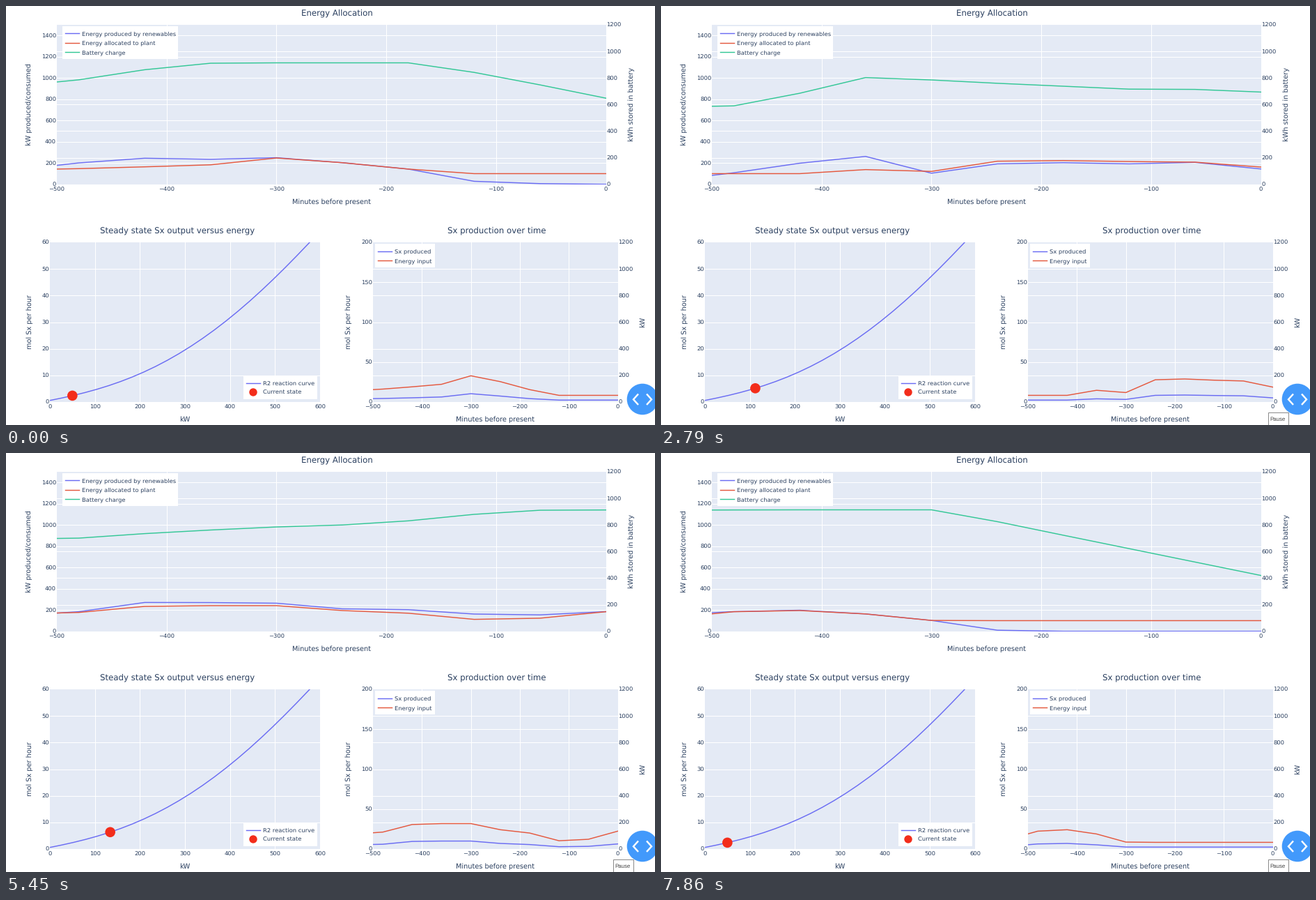
A matplotlib script for the animation above (8000 ms loop, 932 by 601 pixels).

```python
import numpy as np
import matplotlib.pyplot as plt
from matplotlib.animation import FuncAnimation
from matplotlib.patches import Circle, Rectangle

W, H, DPI = 932, 601, 100
PX = 72 / DPI
LOOP, STEP = 8000, 25
INK, PANEL = "#2a3f5f", "#e4eaf5"
BLUE, RED, GREEN, DOT = "#6a6cf3", "#e4583e", "#33c796", "#f32d1b"
TICK, LABEL, TITLE = 8.35, 9.75, 11.8

plt.rcParams["font.family"] = "DejaVu Sans"
plt.rcParams["text.hinting"] = "none"

# Hourly readings, oldest first
renewables = np.array([
    131, 201, 245, 235, 250, 203, 143, 28, 6, 0, 34, 108, 198, 262, 104, 192,
    203, 192, 206, 144, 184, 271, 270, 264, 211, 203, 162, 154, 185, 198, 163,
    102, 10, 0, 0, 0, 0])
plant = np.array([
    135, 147, 164, 183, 247, 203, 143, 100, 100, 100, 100, 100, 100, 138, 121,
    217, 223, 214, 208, 162, 177, 234, 241, 241, 195, 170, 112, 123, 184, 195,
    163, 102, 100, 100, 100, 100, 100])
battery = np.array([
    738, 786, 862, 911, 914, 914, 914, 842, 748, 648, 581, 590, 685, 803, 785,
    760, 738, 716, 714, 694, 701, 735, 762, 785, 800, 831, 880, 911, 913, 914,
    914, 914, 825, 723, 622, 521, 420])

# Moments (ms) at which one more hour arrives
ticks = [70, 390, 720, 990, 1320, 1580, 1860, 2130, 2460, 2790, 3060, 3390,
         3740, 4070, 4400, 4600, 4860, 5120, 5450, 5780, 6040, 6390, 6660,
         6990, 7260, 7530, 7860]
TIP_START, TIP_FULL = 2200, 2260
minutes = np.arange(-540, 1, 60)

curve = np.poly1d(np.polyfit([0, 100, 200, 300, 400, 500, 577],
                             [0.6, 4.5, 10.7, 19.5, 31.6, 46.8, 60], 4))
load = plant - 50
sx = curve(load)

fig = plt.figure(figsize=(W / DPI, H / DPI), dpi=DPI, facecolor="white")
ax = fig.add_axes([0, 0, 1, 1])
ax.set(xlim=(0, W), ylim=(H, 0))
ax.axis("off")


def text(x, y, s, size=TICK, ha="center", rot=0, z=6, **kw):
    shift = 0.36 * size
    if rot:
        x += shift
    else:
        y += shift
    return ax.text(x, y, s, fontsize=size * PX, ha=ha, va="baseline",
                   rotation=rot, rotation_mode="anchor", zorder=z,
                   **{"color": INK, **kw})


def line(xs, ys, color, width=1.45, z=3, **kw):
    return ax.plot(xs, ys, color=color, lw=width * PX, zorder=z, **kw)[0]


def box(x0, y0, x1, y1, color, z, **kw):
    return ax.add_patch(Rectangle((x0, y0), x1 - x0, y1 - y0, fc=color,
                                  zorder=z, **{"lw": 0, **kw}))


class Panel:
    def __init__(self, x0, y0, x1, y1, xr, top, top2=None):
        self.x0, self.y0, self.x1, self.y1 = x0, y0, x1, y1
        self.xr, self.top, self.top2 = xr, top, top2
        self.frame = box(x0, y0, x1, y1, PANEL, 0)

    def x(self, v):
        lo, hi = self.xr
        return self.x0 + (np.asarray(v) - lo) / (hi - lo) * (self.x1 - self.x0)

    def y(self, v, top=None):
        return self.y1 - np.asarray(v) / (top or self.top) * (self.y1 - self.y0)

    def axes(self, xstep, ystep, ystep2=None):
        for v in range(self.xr[0], self.xr[1] + 1, xstep):
            x = self.x(v)
            if self.xr[0] < v < self.xr[1]:
                line([x, x], [self.y0, self.y1], "white", 1, 1)
            text(x, self.y1 + 6.7, str(v).replace("-", "\u2212"))
        self.side(ystep, self.top, self.x0 - 1, "right")
        if ystep2:
            self.side(ystep2, self.top2, self.x1 + 1, "left")

    def side(self, step, top, x, ha):
        for v in range(0, top + 1, step):
            y = self.y(v, top)
            if 0 < v < top:
                line([self.x0, self.x1], [y, y], "white", 1, 1)
            text(x, y + 0.3, str(v), ha=ha)

    def trace(self, color, z=3):
        ln = line([], [], color, z=z, solid_joinstyle="round")
        ln.set_clip_path(self.frame)
        return ln


def legend(x0, y0, x1, y1, rows):
    box(x0, y0, x1, y1, "white", 4)
    for i, (name, color) in enumerate(rows):
        y = y0 + 10.4 + 13.3 * i
        if color == DOT:
            ax.add_patch(Circle((x0 + 14, y), 5.7, fc=DOT, lw=0, zorder=5))
        else:
            line([x0 + 4, x0 + 24], [y, y], color, z=5)
        text(x0 + 28, y, name, ha="left")


alloc = Panel(73, 27, 861.5, 255.7, (-500, 0), 1500, 1200)
alloc.axes(100, 200, 200)
steady = Panel(63, 339, 451, 568, (0, 600), 60)
steady.axes(100, 10)
prod = Panel(527, 339, 878.5, 568, (-500, 0), 200, 1200)
prod.axes(100, 50, 200)

text(475.5, 9.5, "Energy Allocation", TITLE)
text(246.5, 321.5, "Steady state Sx output versus energy", TITLE)
text(705, 321.5, "Sx production over time", TITLE)
text(467, 280.5, "Minutes before present", LABEL)
text(257, 592.5, "kW", LABEL)
text(702, 592.5, "Minutes before present", LABEL)
text(32, 141, "kW produced/consumed", LABEL, rot=90)
text(897, 141, "kWh stored in battery", LABEL, rot=90)
text(33, 453.5, "mol Sx per hour", LABEL, rot=90)
text(491, 453.5, "mol Sx per hour", LABEL, rot=90)
text(914, 453.5, "kW", LABEL, rot=90)

legend(81, 29, 247, 75.5, [("Energy produced by renewables", BLUE),
                           ("Energy allocated to plant", RED),
                           ("Battery charge", GREEN)])
legend(341, 530.3, 447, 564, [("R2 reaction curve", BLUE),
                              ("Current state", DOT)])
legend(530, 341.3, 616, 375, [("Sx produced", BLUE), ("Energy input", RED)])

kw = np.linspace(0, 600, 24)
steady.trace(BLUE).set_data(steady.x(kw), steady.y(curve(kw)))
state = ax.add_patch(Circle((0, 0), 7.3, fc=DOT, lw=0, zorder=3.5))

# Each trace: line, panel, values, axis maximum
traces = [(alloc.trace(BLUE), alloc, renewables, 1500),
          (alloc.trace(RED), alloc, plant, 1500),
          (alloc.trace(GREEN), alloc, battery, 1200),
          (prod.trace(BLUE), prod, sx, 200),
          (prod.trace(RED), prod, load, 1200)]

# Round button with two chevrons
ax.add_patch(Circle((914, 564), 22.3, fc="#4299fb", lw=0, zorder=7))
for tip, back in ((901, 908), (927, 920)):
    line([back, tip, back], [556.5, 564.3, 572], "white", 2.4, 8,
         solid_joinstyle="miter", solid_capstyle="butt")

tooltip = [box(871.5, 582.5, 900.5, 600.5, "white", 9, ec="#8a8a8a", lw=PX),
           text(886, 592, "Pause", 7.9, z=10, color="#444444",
                family="Liberation Sans")]


def draw(n):
    now = (n + 1) * STEP - 1
    hour = sum(t <= now for t in ticks)
    for ln, panel, values, top in traces:
        ln.set_data(panel.x(minutes), panel.y(values[hour:hour + 10], top))
    state.center = steady.x(load[hour + 9]), steady.y(sx[hour + 9])
    alpha = 0 if now < TIP_START else 0.5 if now < TIP_FULL else 1
    for part in tooltip:
        part.set_alpha(alpha)
    return [t[0] for t in traces] + [state] + tooltip


anim = FuncAnimation(fig, draw, frames=LOOP // STEP, interval=STEP,
                     repeat=True, repeat_delay=0)
plt.show()
```
